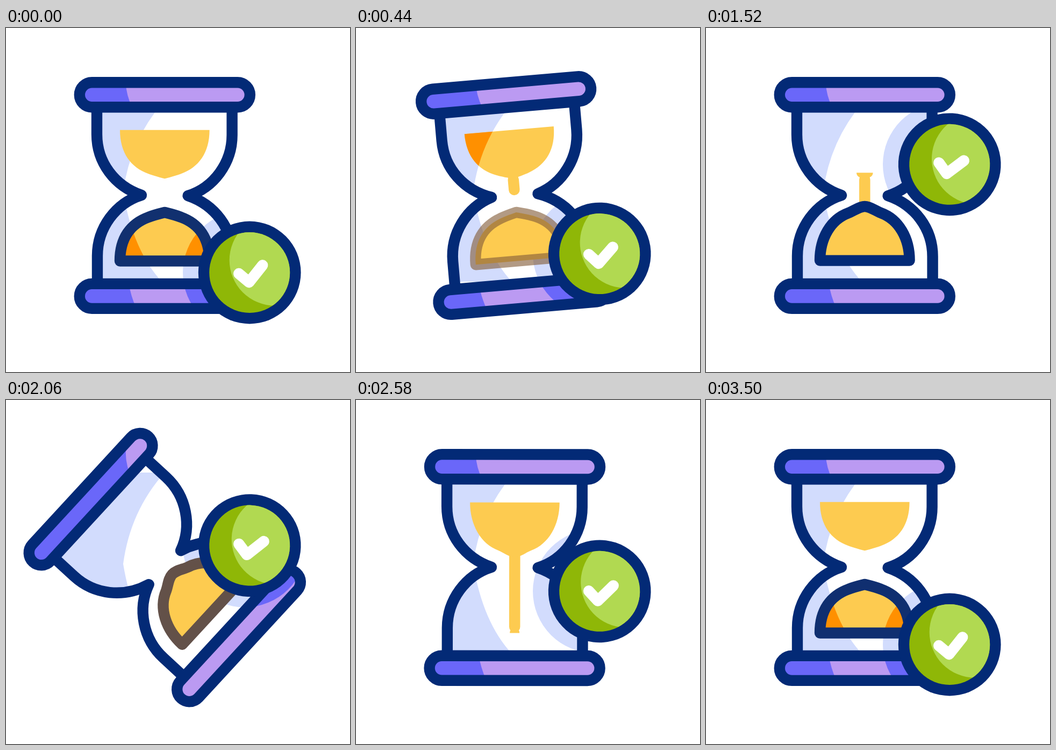
Recreate the animation shown at these times as an HTML page with a canvas. Size 640 by 640 pixels, loop 3520 ms.

```html
<!DOCTYPE html>
<html lang="en">
<head>
<meta charset="utf-8">
<title>Hourglass</title>
<style>
  html, body { margin: 0; width: 100%; height: 100%; overflow: hidden; background: #fff; }
  canvas { display: block; width: 100vmin; height: 100vmin; }
</style>
</head>
<body>
<canvas id="stage" width="640" height="640"></canvas>
<script>
const ctx = document.getElementById('stage').getContext('2d');
const LOOP = 3520, FLIP_BACK = 2000, FLIP_TIME = 600;
const CX = 295.3, CY = 311.6, BASE = 433.5, APEX = 343;
const NAVY = [3, 42, 118], ORANGE = [255, 144, 0];
const navy = `rgb(${NAVY})`, orange = `rgb(${ORANGE})`, yellow = '#fdcb50';

const glass = new Path2D(`M169 140V198C169 250 202 294 252 311C204 326 170 372 170 424V485
  H421.6V425C421.6 373 388.6 329 338.6 312C386.6 297 420.6 251 420.6 199V138Z`);
const cap = y => {
  const p = new Path2D();
  p.roundRect(136.8, y, 317, 46, 23);
  return p;
};
const caps = [cap(101.3), cap(475.9)];

// The shadows keep their place on the stage while the hourglass turns.
const glassShade = new Path2D('M295 135Q231 207 218 305Q236 414 290 472H0V135Z');
const capShade = new Path2D('M230 0V60Q213 105 236 150L228 470Q230 495 246 530V640H0V0Z');

const ramp = (t, from, to) => Math.min(1, Math.max(0, (t - from) / (to - from)));
const smooth = x => x * x * (3 - 2 * x);

// cubic-bezier(.143, 0, 0, 1)
function flipEase(x) {
  let lo = 0, hi = 1;
  for (let i = 0; i < 24; i++) {
    const p = (lo + hi) / 2;
    if (0.43 * (1 - p) ** 2 * p + p ** 3 < x) lo = p; else hi = p;
  }
  return smooth(lo);
}

function turn(angle) {
  ctx.translate(CX, CY);
  ctx.rotate(angle);
  ctx.translate(-CX, -CY);
}

function disc(x, y, r, color) {
  ctx.beginPath();
  ctx.arc(x, y, r, 0, 7);
  ctx.fillStyle = color;
  ctx.fill();
}

function shade(shape, left, color, badgeY) {
  ctx.save();
  ctx.clip(shape);
  ctx.resetTransform();
  ctx.fillStyle = color;
  ctx.fill(left);
  disc(444, badgeY, 115, color);
  ctx.restore();
}

function outline(shape, color = navy) {
  ctx.strokeStyle = color;
  ctx.lineWidth = 20.4;
  ctx.stroke(shape);
}

// Heap with its base down; a higher swell gives a taller, rounder top.
function heap(swell) {
  const base = BASE - swell, top = APEX - 12.5 * swell;
  const shoulder = 352 - 9 * swell, side = 364 - 9 * swell, soft = 11 * swell;
  const right = x => 2 * CX - x;
  return new Path2D(`M212 ${base}C212 391 232 ${side} 265 ${shoulder}
    C275 ${shoulder - 4} ${CX - soft} ${top} ${CX} ${top}
    C${CX + soft} ${top} ${right(275)} ${shoulder - 4} ${right(265)} ${shoulder}
    C${right(232)} ${side} ${right(212)} 391 ${right(212)} ${base}Z`);
}

function drawHeap(shape, ink, shadow, badgeY) {
  ctx.fillStyle = yellow;
  ctx.fill(shape);
  if (shadow > 0) {
    ctx.globalAlpha = shadow;
    shade(shape, glassShade, orange, badgeY);
  }
  if (ink > 0) {
    ctx.globalAlpha = Math.min(1, 2.6 * ink * ink);
    outline(shape, `rgb(${NAVY.map((c, i) => Math.round(c + (ORANGE[i] - c) * (1 - ink)))})`);
  }
  ctx.globalAlpha = 1;
}

function drawStream(t, angle) {
  const back = t >= FLIP_BACK;
  const since = back ? t - FLIP_BACK : t;
  const floor = back ? 422 - 72 * ramp(t, 2580, 3250) : 345;
  const tip = Math.min(floor, 300 + 0.87 * (since - 440));
  const fall = back ? ramp(t, 3260, 3440) : ramp(t, 1660, 1730);
  const top = 282 + 70 * fall;
  if (fall === 1 || tip <= top) return;
  ctx.save();
  turn(back ? angle : angle - Math.PI);
  ctx.beginPath();
  ctx.moveTo(CX, top);
  ctx.lineTo(CX, tip);
  ctx.strokeStyle = yellow;
  ctx.lineWidth = 20.5;
  ctx.stroke();
  ctx.restore();
}

// Sand that starts below, drains after the first flip and piles up again.
function drawFirstSand(t, badgeY) {
  const growing = t > 2560;
  const size = growing ? ramp(t, 2500, 3250) : 1 - ramp(t, 500, 1660);
  if (size <= 0) return;
  const anchor = growing ? BASE : APEX;
  const wide = growing ? size : (6 + 77 * size) / 83;
  ctx.save();
  ctx.translate(CX, anchor);
  ctx.scale(wide, size);
  ctx.translate(-CX, -anchor);
  const ink = 0.95 * (growing ? ramp(t, 3250, 3500) : 1 - ramp(t, 0, 160));
  const shadow = growing ? ramp(t, 3250, 3500) : 1 - ramp(t, 500, 800);
  drawHeap(heap(0), ink, shadow, badgeY);
  ctx.restore();
}

// Sand that starts above and becomes the pile between the flips.
function drawSecondSand(t, badgeY) {
  const swell = ramp(t, 500, 1660) - ramp(t, 2560, 3480);
  const ink = ramp(t, 250, 640) - ramp(t, 2000, 2160);
  ctx.save();
  turn(Math.PI);
  drawHeap(heap(swell), ink, 0, badgeY);
  ctx.restore();
}

function drawBadge(y, angle) {
  ctx.save();
  ctx.translate(453.2, y);
  ctx.rotate(angle);
  disc(0, 0, 95.4, navy);
  disc(0, 0, 75, '#8fb707');
  ctx.save();
  ctx.clip();
  disc(47, -23, 84.5, '#b1d951');
  ctx.restore();
  outline(new Path2D('M-20 2L-1 18L24 -13.5'), '#fff');
  ctx.restore();
}

function draw(t) {
  const lift = smooth(ramp(t, 0, 1690)) - smooth(ramp(t, 1715, 3400));
  const badgeY = 455 - 207 * lift;
  const angle = Math.PI * (flipEase(ramp(t, 0, FLIP_TIME))
    - flipEase(ramp(t, FLIP_BACK, FLIP_BACK + FLIP_TIME)));

  ctx.resetTransform();
  ctx.fillStyle = '#fff';
  ctx.fillRect(0, 0, 640, 640);
  ctx.lineCap = ctx.lineJoin = 'round';

  ctx.save();
  turn(angle);
  shade(glass, glassShade, '#d2dcfd', badgeY);
  drawStream(t, 0);
  drawSecondSand(t, badgeY);
  drawFirstSand(t, badgeY);
  outline(glass);
  for (const c of caps) {
    ctx.fillStyle = '#bb9af2';
    ctx.fill(c);
    shade(c, capShade, '#6a67f9', badgeY);
    outline(c);
  }
  ctx.restore();

  drawBadge(badgeY, lift * Math.PI / 12);
}

const start = performance.now();
function tick() {
  draw((performance.now() - start) % LOOP);
  requestAnimationFrame(tick);
}
tick();
</script>
</body>
</html>
```
